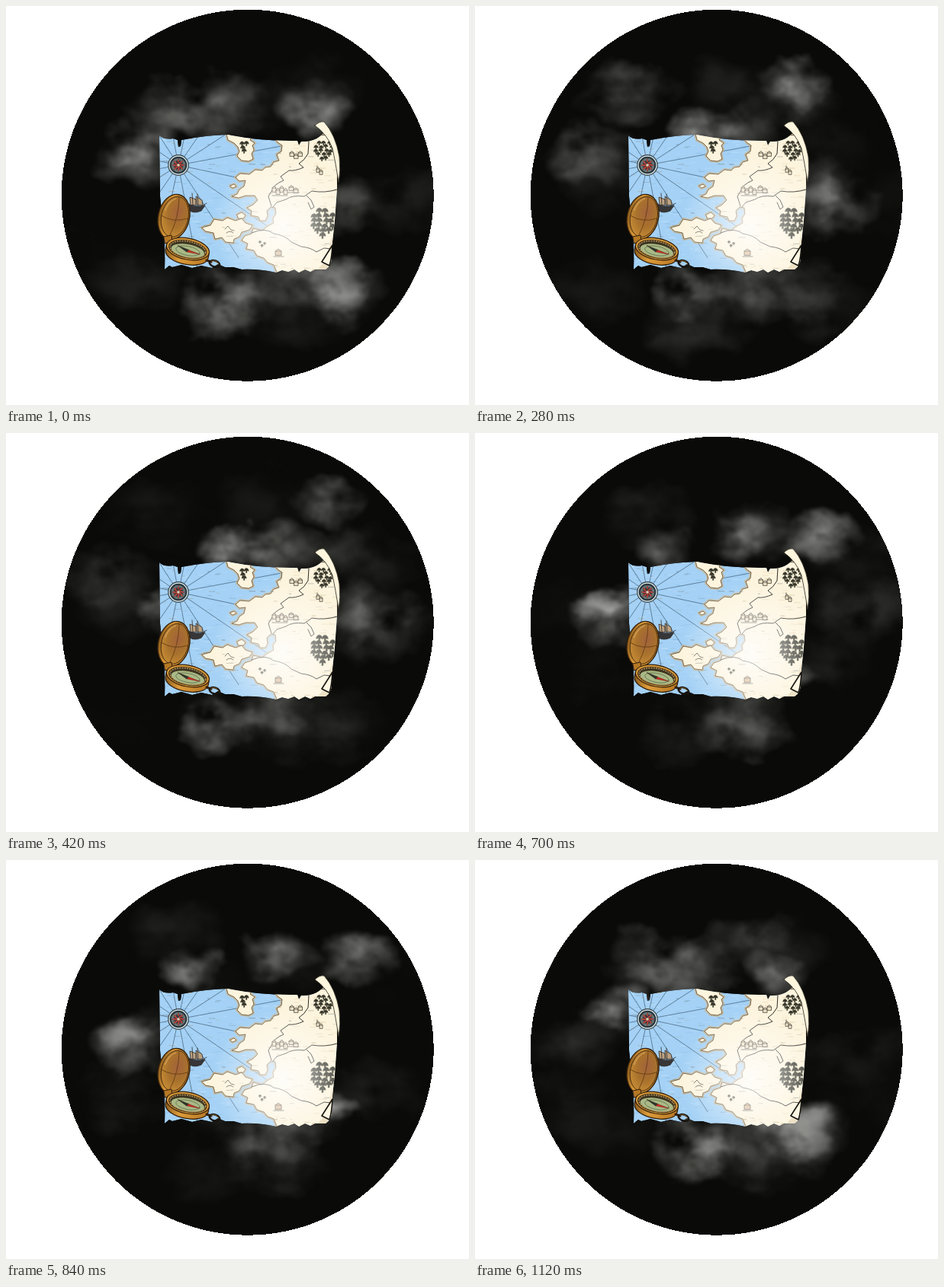
Animation, 607 px wide and 524 px high, one loop 1260 ms. Source, as an HTML page:

```html
<!DOCTYPE html>
<html lang="en">
<head>
<meta charset="utf-8">
<title>Map in smoke</title>
<style>
html, body { margin: 0; width: 100%; height: 100%; overflow: hidden; background: #fff; }
svg { display: block; width: 100vw; height: 100vh; }
</style>
</head>
<body>
<svg viewBox="0 0 607 524" fill="none" stroke-linejoin="round" stroke-linecap="round">
  <defs>
    <radialGradient id="puff">
      <stop offset="0" stop-color="#d6d6d4"/>
      <stop offset=".45" stop-color="#d6d6d4" stop-opacity=".65"/>
      <stop offset="1" stop-color="#d6d6d4" stop-opacity="0"/>
    </radialGradient>
    <radialGradient id="glow" gradientUnits="userSpaceOnUse" cx="362" cy="288" r="92">
      <stop offset="0" stop-color="#fff" stop-opacity=".8"/>
      <stop offset=".45" stop-color="#fff" stop-opacity=".45"/>
      <stop offset="1" stop-color="#fff" stop-opacity="0"/>
    </radialGradient>
    <radialGradient id="lid" cx=".58" cy=".38" r=".65">
      <stop offset="0" stop-color="#a2623c"/>
      <stop offset=".55" stop-color="#a8712c"/>
      <stop offset="1" stop-color="#c58b35"/>
    </radialGradient>
    <linearGradient id="rim">
      <stop offset="0" stop-color="#8c5b1c"/>
      <stop offset=".35" stop-color="#dd9c3a"/>
      <stop offset="1" stop-color="#b87824"/>
    </linearGradient>
    <filter id="wisp" filterUnits="userSpaceOnUse" x="60" y="0" width="515" height="500" color-interpolation-filters="sRGB">
      <feTurbulence type="fractalNoise" baseFrequency=".017 .021" numOctaves="4" seed="4" result="n"/>
      <feDisplacementMap in="SourceGraphic" in2="n" scale="50" xChannelSelector="R" yChannelSelector="G" result="d"/>
      <feColorMatrix in="n" values="0 0 0 0 1  0 0 0 0 1  0 0 0 0 1  0 0 2.2 0 -.35" result="m"/>
      <feComposite in="d" in2="m" operator="in"/>
      <feGaussianBlur stdDeviation="1.6"/>
    </filter>
    <clipPath id="disc"><circle cx="316.700" cy="248.700" r="244"/></clipPath>
    <path id="sheet" d="M201 170Q207 176 219 174L225 176L226 185L229 184L230 176Q260 170 290 169Q336 178 382 177L384 183L387 178Q402 179 412 171L418 165Q431 185 434 212L434 240L431 282L428 310L427 330Q427 341 419 346L405 346L399 349L392 346L384 350L378 346L370 349L362 347L354 350Q330 345 309 346L298 343L287 343L278 339L270 344L256 341L244 344L230 340L218 343L214 341L208 346Q209 320 206 288L202 250Z"/>
    <clipPath id="page"><use href="#sheet"/></clipPath>
    <path id="land" d="M289 168L291 176L299 180L304 185L306 191L303 197L309 203L318 204L324 201L322 194L325 189L323 183L326 180L320 176L324 168ZM350 170L356 179L362 183L361 191L355 195L358 203L351 205L347 211L340 212L336 216L327 215L319 221L307 220L301 225L306 230L314 229L312 237L306 241L303 247L296 250L305 252L314 249L326 249L330 255L324 261L316 265L322 269L321 275L331 277L333 282L340 282L343 276L342 269L347 264L353 265L354 273L350 279L351 285L342 290L336 295L324 292L322 299L313 302L309 308L317 312L315 319L325 321L329 328L338 331L343 337L351 340L357 354L445 354L445 170Z"/>
    <path id="isles" d="M257 291L268 288L273 280L284 282L290 278L301 282L309 279L314 285L323 288L319 294L309 297L306 303L299 306L298 311L288 310L283 304L274 306L272 298L262 296ZM303 274L309 271L314 275L311 279L305 279ZM294 236L299 234L302 237L297 239Z"/>
  </defs>

  <circle cx="316.700" cy="248.700" r="244" fill="#0a0a08" shape-rendering="crispEdges"/>
  <g clip-path="url(#disc)"><g id="smoke" filter="url(#wisp)"></g></g>

  <g clip-path="url(#page)">
    <use href="#sheet" fill="#a4d1f5"/>
    <g id="sea"></g>
    <g id="rays" stroke="#38536a" stroke-width=".6"></g>
    <g stroke="#cfae7a" stroke-width="4" stroke-opacity=".65"><use href="#land"/><use href="#isles"/></g>
    <g fill="#fdf4dd" stroke="#6b5840" stroke-width=".9"><use href="#land"/><use href="#isles"/></g>
    <g id="grain"></g>
    <g stroke="#2e2b26">
      <path d="M397 178L396 194Q391 203 384 207L390 212Q379 217 371 216L360 224L364 229Q350 235 349 242L344 250L348 263"/>
      <path d="M434 241Q418 246 401 243L391 250Q375 248 367 254L355 258L350 264M394 249L400 255L404 264L400 267L396 258"/>
      <path d="M322 298Q340 290 351 299Q366 301 374 310L387 316Q399 317 407 323L417 318L427 319"/>
    </g>
    <g id="icons" stroke="#4b443b" stroke-width=".8">
      <path d="M351 329h13M369 245h15M349 249h20M408 213v-3M287 293l4-4l4 5l4 1M289 298q5-4 9 0"/>
    </g>
    <g id="trees" fill="#35342b" stroke="#69694e" stroke-width=".4"></g>
    <use href="#sheet" fill="url(#glow)"/>
    <path d="M428 300L428 352L402 350Q416 343 422 325Z" fill="#a88c58" opacity=".2"/>
  </g>
  <path d="M405 157Q411 151 417 152Q432 169 437 198Q439 216 436 232Q432 205 428 187Q421 168 405 157Z" fill="#fdf5dd" stroke="#29251c" stroke-width=".8"/>
  <path d="M428 314L414 336L424 341Q427 332 428 314Z" fill="#fdf6e2" stroke="#15130f" stroke-width="1.6"/>

  <g id="rose" transform="translate(226 209)">
    <circle r="13.300" fill="#d2e2e4" stroke="#35424a" stroke-width="1.2"/>
    <circle r="10.300" fill="#697879" stroke="#27333a" stroke-width="2"/>
  </g>

  <g stroke="#2f2924" stroke-width=".8">
    <path d="M238 259Q246 265 261 262L256 269Q247 273 241 269Z" fill="#373638"/>
    <path d="M242 261L241 251L249 254L249 261ZM250 261L249 250L257 255L258 261Z" fill="#bca384"/>
    <path d="M245 262L244 246M252 262L251 247M238 259L234 255M258 262L263 259"/>
  </g>

  <g stroke="#35200c">
    <g transform="rotate(13 220 277)">
      <ellipse cx="220" cy="277" rx="20.500" ry="30" fill="url(#rim)" stroke-width="1.4"/>
      <ellipse cx="221.300" cy="276.500" rx="17.600" ry="27" fill="url(#lid)" stroke-width=".8"/>
      <path d="M221 250Q227 277 220 303M204 279Q221 285 238 275" stroke="#5d3510" stroke-width=".7"/>
      <path d="M207 271Q209 258 217 253" stroke="#e4b069" stroke-width="1.5" opacity=".6"/>
    </g>
    <path d="M207 303L217 301L218 309L209 312Z" fill="#b57825"/>
    <g transform="rotate(11 238 321)">
      <path d="M209.500 319V326C212 344 264 344 266.500 326V319Z" fill="url(#rim)" stroke-width="1.3"/>
      <ellipse cx="238" cy="319" rx="28.500" ry="14" fill="#d19538" stroke-width="1.2"/>
      <ellipse cx="238" cy="319.500" rx="25" ry="11.300" fill="#3c3523"/>
      <ellipse cx="238.500" cy="321.500" rx="22.500" ry="9" fill="#a9b986" stroke-width=".7"/>
      <ellipse cx="238.500" cy="321.500" rx="16" ry="6" stroke="#596747" stroke-width=".7"/>
      <ellipse cx="238" cy="319.500" rx="23.700" ry="10.300" stroke="#b8975c" stroke-width="1.5" stroke-dasharray=".8 2.4"/>
      <path d="M238 320L255 323L237 323Z" fill="#d32b24" stroke="#6d1e17" stroke-width=".5"/>
      <path d="M239 320L224 317L237 323Z" fill="#283330" stroke-width=".5"/>
    </g>
    <path d="M263 334L269 336" stroke-width="3"/>
    <ellipse cx="273.500" cy="338.500" rx="7" ry="4" transform="rotate(20 273.5 338.5)" stroke="#171410" stroke-width="2.5"/>
    <path d="M269 335Q276 333 279 339" stroke="#a77735" stroke-width=".8"/>
  </g>
</svg>

<script type="module">
const STEP = 140, COUNT = 9, SPAN = 2.4;
const $ = id => document.getElementById(id);

function add(parent, tag, attrs) {
  const el = document.createElementNS("http://www.w3.org/2000/svg", tag);
  for (const key in attrs) el.setAttribute(key, attrs[key]);
  parent.append(el);
  return el;
}

let seed = 17;
function rand(lo, hi) {
  seed = (seed * 16807) % 2147483647;
  return lo + (hi - lo) * seed / 2147483647;
}

// Paper and water flecks
function flecks(group, count, colors, x0, x1) {
  for (let i = 0; i < count; i++)
    add(group, "path", {
      d: `M${rand(x0, x1)} ${rand(170, 350)}h${rand(2, 9)}`, stroke: colors[i % colors.length],
      "stroke-width": rand(.4, .9), opacity: rand(.25, .75)
    });
}
flecks($("sea"), 330, ["#d5ebfc", "#83b6df", "#c1e0f8"], 200, 360);
flecks($("grain"), 75, ["#4f5c61", "#a98e62"], 205, 430);
flecks($("grain"), 90, ["#d8be8d", "#b99c6b"], 345, 432);

// Bearing lines and rose
for (let i = 0; i < 16; i++) {
  const turn = i * 22.5;
  add($("rays"), "path", { d: "M0 0H145", transform: `translate(226 209) rotate(${turn - 10.5})` });
  add($("rose"), "path", {
    d: i % 2 ? "M0 0L-1.2 -4L0 -7L1.2 -4Z" : "M0 0L-1.8 -3L0 -9L1.8 -3Z",
    fill: i % 2 ? "#263d42" : "#c9423b", stroke: "#472d2c", "stroke-width": .3,
    transform: `rotate(${turn})`
  });
}
add($("rose"), "circle", { r: 1.8, fill: "#d8d1b5" });

// Rows of trees centred on x, from y down
function wood(x, y, rows, gap, size) {
  rows.forEach((n, row) => {
    for (let i = 0; i < n; i++) {
      const tx = x + (i - (n - 1) / 2) * gap + rand(-1.5, 1.5), ty = y + row * gap * .8 + rand(-1, 1);
      add($("trees"), "path", {
        d: "M-4 1Q-4 -3 0 -4Q4 -3 4 1L1 .6V4H-1V.6Z",
        transform: `translate(${tx} ${ty}) scale(${size})`
      });
    }
  });
}
wood(417, 180, [3, 4, 4, 3, 2], 6.5, .75);
wood(415, 270, [2, 4, 4, 4, 3, 1], 8, 1.05);
wood(312, 181, [2, 1, 1], 6, .8);
wood(336, 311, [2, 1], 5, .5);

// A row of small houses
function village(x, y, n, w, h, fill = "#eee2c5") {
  for (let i = 0; i < n; i++)
    add($("icons"), "path", {
      d: `M${x + i * w} ${y + i % 2 * 3}v${-h}l${w / 2} ${-h * .6}l${w / 2} ${h * .6}v${h}zm0 ${-h}h${w}`,
      fill
    });
}
village(372, 197, 3, 5.5, 4);
village(407, 218, 2, 4, 4);
village(349, 244, 4, 5, 5);
village(371, 242, 2, 6, 4);
village(353, 327, 1, 8, 5, "#d9b58e");

// Puffs around the map: step of peak, bearing, reach, size
const puffs = [
  [0, -58, 1.08, 52], [0, 50, 1.32, 68], [.2, 98, 1.21, 70], [.8, -124, 1.29, 66],
  [1, 71, .96, 74], [1.2, -156, 1.14, 64], [1.3, 2, .97, 62], [1.8, -62, 1.42, 52],
  [2.6, -95, .89, 44], [2.6, 106, 1.12, 50], [3.3, -9, 1.07, 70], [3.5, -71, .92, 64],
  [4, 78, 1.06, 60], [4.2, -169, .86, 44], [5, -48, 1.34, 52], [6, -175, 1.05, 58],
  [6.2, -77, 1.11, 54], [6.2, 76, .9, 74], [6.4, -118, 1.11, 50], [6.6, 38, .95, 44],
  [8, 98, 1.01, 72], [8, 53, 1.09, 60], [8.2, -147, 1.01, 50], [8.3, -105, 1.01, 68]
].map(([peak, bearing, reach, size]) => ({
  peak, reach, size, angle: bearing * Math.PI / 180, strength: 32 / size
}));

// Thin haze further out
for (let i = 0; i < 12; i++)
  puffs.push({ peak: i * COUNT / 12, angle: i * 2.4, reach: rand(1.1, 1.4), size: 70, strength: .12 });

for (const p of puffs) p.el = add($("smoke"), "ellipse", { fill: "url(#puff)" });

function draw(step) {
  for (const { peak, angle, reach, size, strength, el } of puffs) {
    const age = (step - peak + COUNT * 1.5) % COUNT - COUNT / 2;
    const far = reach + age * .1, grown = size * (1 + age * .05);
    el.setAttribute("cx", 317 + 150 * far * Math.cos(angle));
    el.setAttribute("cy", 255 + 120 * far * Math.sin(angle));
    el.setAttribute("rx", grown);
    el.setAttribute("ry", grown * .66);
    el.setAttribute("opacity", strength * Math.max(0, 1 - (age / SPAN) ** 2));
  }
}

const start = performance.now();
let shown = 0;
function tick() {
  const step = Math.floor(Math.max(0, performance.now() - start) / STEP) % COUNT;
  if (step !== shown) draw(shown = step);
  requestAnimationFrame(tick);
}
draw(0);
requestAnimationFrame(tick);
</script>
</body>
</html>
```
